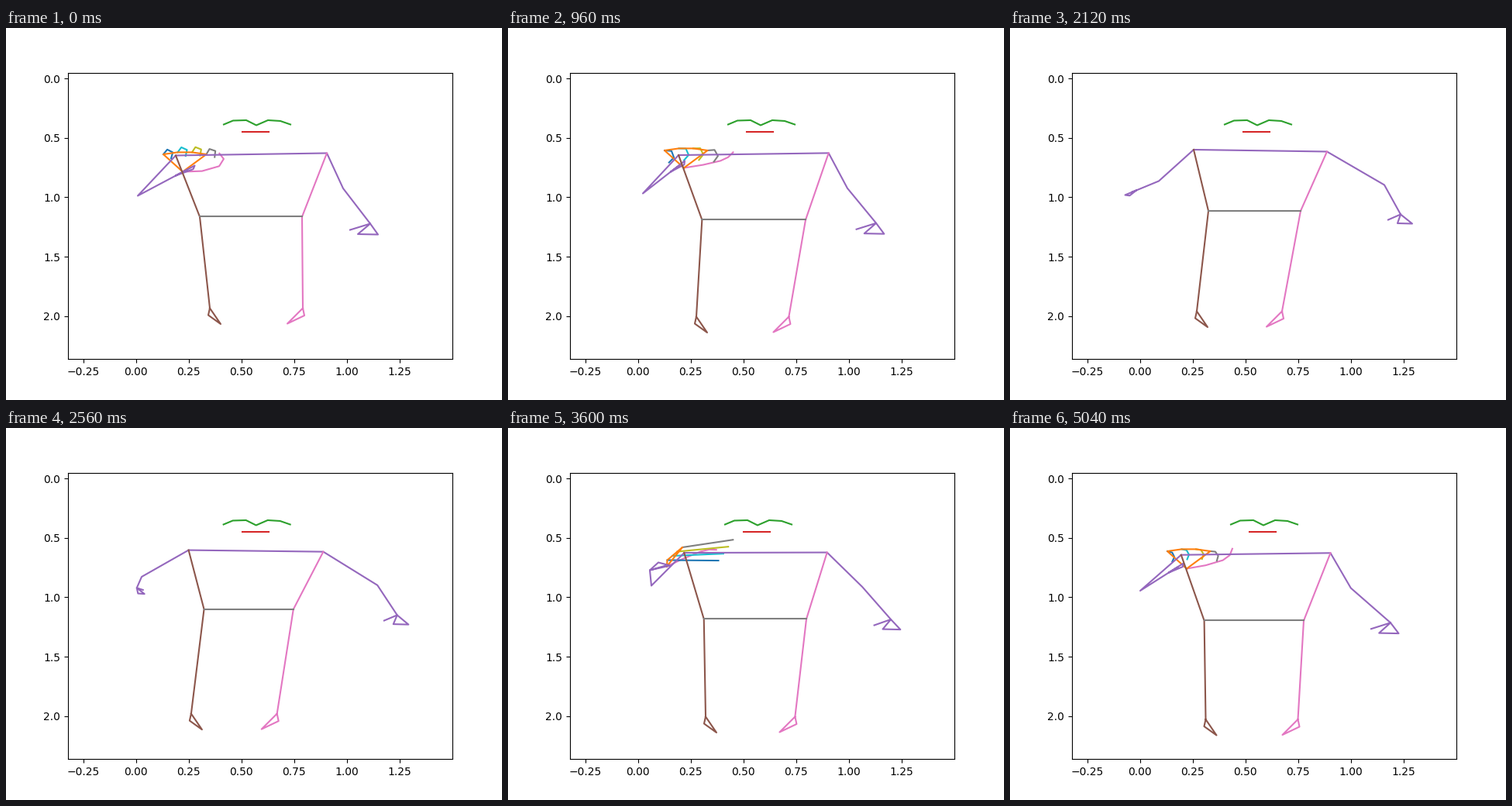
Recreate the animation shown at these times as a matplotlib script. Size 640 by 480 pixels, loop 5080 ms.

```python
import numpy as np
import matplotlib.pyplot as plt
from matplotlib.animation import FuncAnimation

FRAMES, STEP = 127, 40
KEYS = [0, 24, 53, 74, 90, 104, 126]
HAND_KEYS = [0, 24, 90, 126]
HAND_SEEN = [(0, 36), (84, 97), (112, 126)]
clock = np.arange(FRAMES)

# Points are complex numbers x + yj in stage pixels, with y pointing down.


def key(*values):
    return np.interp(clock, KEYS, values)


def hand_key(*values):
    return np.interp(clock, HAND_KEYS, values)


def chain(start, lengths, headings):
    """Joints of a limb from its segment lengths and headings in degrees."""
    joints = [start]
    for length, heading in zip(lengths, headings):
        joints.append(joints[-1] + length * np.exp(1j * np.radians(heading)))
    return joints


# How far the arms hang apart, and a small swing between two poses
spread = key(0, 0.06, 1, 0.85, 0.46, 0.27, 0.1)
swing = np.sin(np.pi * np.interp(clock, KEYS, range(len(KEYS)))) ** 2

# Face
nose = key(323, 326, 319, 326, 322, 322, 327) + 125j
brow = [-42 - 1j, -30 - 6j, -13 - 6.5j, 0, 15 - 6.5j, 31 - 5.5j, 44 - 1j]
face = [nose + d for d in brow]
mouth = [nose - 18 + 8.5j, nose + 16 + 8.5j]

# Right arm: the short hand lines continue the forearm
shoulder_r = 219 + 164j + spread * (18 - 7.5j)
elbow_r = (key(170, 174, 192, 165, 185, 175, 168)
           + 1j * key(216, 213, 197, 186.5, 203, 209, 209.5)
           - 36 * swing * (1 - spread))
wrist_r = (key(219, 210, 163, 174, 183, 197, 205)
           + 1j * key(190, 185, 209, 203, 183, 188, 186))
forearm = wrist_r - elbow_r + 0.0
turn = key(0, 0, 0, 18, 24, -4, 0)
pinky_r = wrist_r + 0.5 * forearm + 0.5 * turn
index_r = wrist_r + 0.4 * forearm + 3 + 2j + turn
thumb_r = wrist_r + 0.25 * forearm + 2 - 1j + 0.8 * turn

# Left arm
shoulder_l = 414 + 161j - spread * (5 + 2j)
elbow_l = 435 + 206.5j + spread * (48 - 4.5j)
wrist_l = (key(470, 475, 504, 494, 494, 491, 491) + 6 * swing
           + 1j * (252 - 12 * spread))
pinky_l = wrist_l + 10 + 14j + spread * (5 - 2j)
index_l = wrist_l - 16 + 13.5j + spread * (12 - 2j)
thumb_l = wrist_l - 26 + 8j + spread * (10 - 1j)

# Legs
hip_y = 1j * key(243, 247, 235.5, 231.5, 246, 246, 248)
hip_r = 250 + 6 * spread + hip_y
hip_l = key(382, 384, 375, 367, 385, 380, 379) + hip_y
ankle_r = (key(263, 243, 241, 237, 255, 260, 252.5)
           + 1j * (key(361, 372, 365, 361.5, 372, 372.5, 375.5) + 5 * swing))
ankle_l = ankle_r + 120 - 10 * spread


def side(shoulder, hip, ankle, heel, toe):
    knee = hip + 0.55 * (ankle - hip)
    return [shoulder, hip, knee, ankle, ankle + heel, ankle + toe, ankle]


# Detailed right hand: a fist that opens once to point
fist = hand_key(1, 1, 0, 1)
reach = hand_key(8, 9, 22, 6.5)
rise = hand_key(-55, 0, -4, 10)
bend = hand_key(78, 65, 0, 50)
root = wrist_r + hand_key(9, 17, 22, 23) - 5j

thumb_rise = hand_key(-2, -9, -25, -10)
thumb_curl = hand_key(-14, -4, 3, -6.5)
thumb = chain(root, [25, 23, 11, 9],
              [thumb_rise + thumb_curl * j ** 2 for j in range(4)])


def finger(k):
    """Finger k, counted from the little finger."""
    closed = -25 + 18.5 * k - 1j * (22.5 + 3 * np.sin(np.pi * k / 3))
    opened = 0.5 + 6.5 * k - 1j * (8 + 5.5 * k)
    knuckle = root + opened + fist * (closed - opened)
    tilt = rise + 3 * (1.5 - k)
    return chain(knuckle, [reach] * 3, [tilt + bend * j for j in range(3)])


fingers = [finger(k) for k in range(4)]
palm = [root] + [f[0] for f in fingers] + [root]

arms = [thumb_r, wrist_r, pinky_r, index_r, wrist_r, elbow_r, shoulder_r,
        shoulder_l, elbow_l, wrist_l, pinky_l, index_l, wrist_l, thumb_l]
hand = [(thumb, "C6"), (fingers[3], "C7"), (fingers[2], "C8"),
        (fingers[1], "C9"), (fingers[0], "C0"), (palm, "C1")]
body = [(face, "C2"), (mouth, "C3"), (arms, "C4"),
        (side(shoulder_r, hip_r, ankle_r, -2 + 9j, 14 + 20.5j), "C5"),
        (side(shoulder_l, hip_l, ankle_l, 2 + 9.5j, -20 + 20j), "C6"),
        ([hip_r, hip_l], "C7")]
parts = [(np.array(path), color) for path, color in hand + body]

fig, ax = plt.subplots(figsize=(6.4, 4.8), dpi=100)
ax.set_xlim(-0.3217, 1.4998)
ax.set_ylim(2.3612, -0.0488)
lines = [ax.plot([], [], color=color)[0] for _, color in parts]


def draw(frame):
    seen = any(a <= frame <= b for a, b in HAND_SEEN)
    for i, (line, (path, _)) in enumerate(zip(lines, parts)):
        points = path[:, frame]
        line.set_data((points.real - 167.6) / 272.3,
                      (points.imag - 64.6) / 153.36)
        line.set_visible(seen or i >= len(hand))
    return lines


anim = FuncAnimation(fig, draw, frames=FRAMES, interval=STEP,
                     repeat=True, repeat_delay=0)
plt.show()
```
